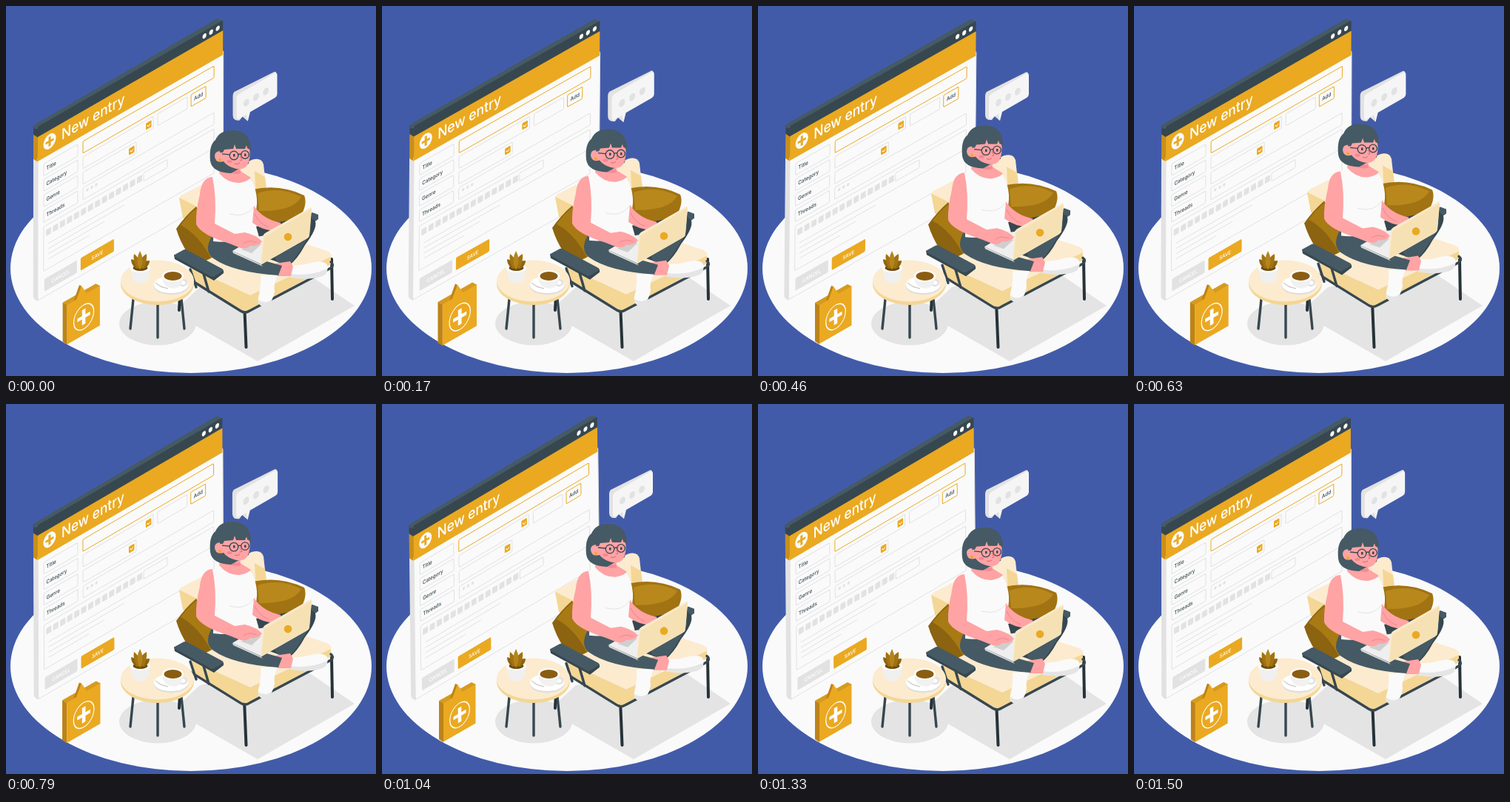
Recreate the animation shown at these times as an HTML page. Size 500 px wide and 500 px high, loop 1.54 s.

```html
<!DOCTYPE html>
<html lang="en">
<head>
<meta charset="utf-8">
<style>
html,body{margin:0;width:100%;height:100%;overflow:hidden;background:#425ba9}
svg{display:block;width:100vw;height:100vh}
text{font-family:Inter,sans-serif;font-weight:500}
.dark{fill:#37474f}.slate{fill:#455a64}.gold{fill:#eaa921}.deep{fill:#bd8318}
.white{fill:#fafafa}.grey{fill:#e2e2e2}.skin{fill:#ffa3a5}.cream{fill:#fcebcf}.sand{fill:#f4d695}
.line{fill:none;stroke:#e1e1e1;stroke-width:1}
.rod{fill:none;stroke:#37474f;stroke-width:3.4;stroke-linecap:round;stroke-linejoin:round}
.leg{stroke:#263238;stroke-width:4}
</style>
</head>
<body>
<svg viewBox="0 0 500 500">
<ellipse class="white" cx="250" cy="354.500" rx="244" ry="141.500"/>
<path fill="#e4e4e4" d="M225 414L340 480L471 405L390 350L262 380Z"/>
<ellipse fill="#e4e4e4" cx="205" cy="429" rx="52" ry="29.500"/>

<g id="panel">
  <path class="grey" d="M37 206L43.500 209V399Q37 397 37 392Z"/>
  <path fill="#c98f1c" d="M37 173L43.500 176V211L37 207Z"/>
  <path class="dark" d="M37 162L43.500 165V178L37 174Z"/>
  <path class="slate" d="M37 166Q37 161 41 159L284 17.500Q288 15.500 293 21L43 166Z"/>
  <g id="face" transform="matrix(1 -.577 0 1 0 24)"></g>
</g>

<g id="bubble">
  <path class="grey" d="M309 116L361 90Q364 88 365 91L316 154Q307 155 307 147V121Q307 118 309 116Z"/>
  <path fill="#f5f5f5" d="M315 119L362 91.500Q366 89.500 366 94V119Q366 122 363 124L330 143L327 155L320 149L315 152Q312 153 312 149V124Q312 121 315 119Z"/>
  <path class="grey" d="M320 149L327 155L325 146Z"/>
  <g class="grey" transform="matrix(1 -.577 0 1 0 195)">
    <ellipse cx="325" cy="123" rx="3.800" ry="4.600"/><ellipse cx="338" cy="123" rx="3.800" ry="4.600"/><ellipse cx="351" cy="123" rx="3.800" ry="4.600"/>
  </g>
</g>

<path class="rod leg" d="M235 390L234 411M440 342L441 396M322 400L324.500 461"/>
<g id="seat">
  <path class="slate" d="M382 291L414 279L422 282V288L400 304Z"/>
  <path class="cream" d="M234 261Q234 257 240 254L332 208Q345 204 348 214L352 250L260 300L239 284Z"/>
  <path class="sand" d="M234 259L258 271L262 300L239 286ZM336 223L350 231L353 255L338 262Z"/>
  <path fill="#a17312" d="M333 248Q370 240 403 256Q408 268 397 286L386 298L340 300Z"/>
  <path fill="#b9881d" d="M340 253Q370 243 399 258Q388 278 342 277Z"/>
  <path fill="#8c6310" d="M230 301Q242 284 257 271L288 326L279 347Q262 345 246 335Q235 318 230 301Z"/>
  <path fill="#a87a14" d="M236 296Q246 282 258 273L289 326L279 345Q262 310 236 296Z"/>
  <path class="cream" d="M250 354L352 304L434 331Q441 334 439 340L330 391Z"/>
  <path class="sand" d="M250 354L330 391L439 339V349L328 414L323 413L254 374Z"/>
  <path class="rod" d="M246 368L317 412Q323 416 329 412L439 354Q444 350 439 346"/>
  <path class="rod" d="M249 356L257 380M267 362L274 386"/>
  <path class="dark" d="M227 336L280 364L294 357V361L281 371L228 342Z"/>
  <path class="slate" d="M228 336L239 330Q242 328 245 330L292 355Q295 357 292 359L282 365Q279 367 276 365L229 339Q226 338 228 336Z"/>

  <path class="dark" d="M338 298L384 289Q412 282 418 291Q421 301 404 323Q394 342 382 351L350 340Z"/>
  <path class="slate" d="M354 316L410 291Q417 296 404 320Q393 339 383 349L366 346Z"/>
  <path class="white" d="M384 350Q399 351 412 347Q430 343 434 350Q437 360 426 365Q408 370 384 366Z"/>
  <path fill="#e5e5e5" d="M384 362Q410 366 434 355Q435 363 425 366Q408 371 384 367Z"/>
  <path class="white" d="M344 364L368 363Q361 374 363 386Q360 402 350 406Q339 406 341 394Q345 380 344 364Z"/>
  <path fill="#e5e5e5" d="M341 397Q350 404 360 396Q356 405 350 407Q341 406 341 397Z"/>
  <path class="skin" d="M364 348L384 345L388 352L385 365L367 365Z"/>
  <path class="slate" d="M278 311Q267 331 280 341Q307 360 368 364L373 351L345 343L318 313Z"/>
  <path class="white" d="M279 232Q290 228 296 220L320 224Q337 235 339 261Q340 272 334 293L338 306Q309 322 280 318L281 278Z"/>
  <path fill="none" stroke="#e4e4e4" d="M302 281Q324 287 335 271"/>
  <path class="skin" d="M291 210L316 210L317 223L331 232Q327 237 316 239Q300 240 288 226Z"/>
  <path fill="#f28c92" d="M296 218Q306 224 316 222L317 226Q304 230 296 218Z"/>
  <path class="skin" d="M335 270Q347 288 371 293L373 304Q350 306 333 293Z"/>
  <path fill="none" stroke="#ee868d" d="M336 281Q342 294 355 299"/>
  <path fill="#d9d9d9" d="M306 331L344 349L347 352L307 334Z"/>
  <path fill="#efefef" d="M306 331L338 312L350 310L345 349Z"/>
  <path fill="#cfcfcf" d="M318 329L337 318L345 322L332 334Z"/>
  <path class="skin" d="M279 231Q264 232 262 254Q256 279 257 295Q263 309 302 321L317 327Q326 329 330 324Q342 325 346 318Q337 309 323 306L309 308L282 294Q285 260 279 231Z"/>
  <path fill="none" stroke="#ee868d" d="M321 321Q329 315 339 320"/>
  <path fill="#fbe9c9" d="M347 312Q347 309 350 307L410 273Q413 271 413 274L410 309Q410 312 407 314L344 350Z"/>
  <path fill="#f6e1b5" d="M349 312L413 274L410 309Q410 312 407 314L345 349Z"/>
  <circle class="gold" cx="381" cy="312" r="5.300"/>

  <g id="head">
    <path class="slate" d="M276 209Q274 188 283 181Q289 167 308 168Q328 169 331 190L328 213L304 226Q278 225 276 209Z"/>
    <path class="skin" d="M291 190Q307 182 329 190Q331 207 326 215Q322 222 311 220Q299 217 294 210Q283 213 282 203Q282 196 290 196Z"/>
    <path class="slate" d="M289 198L291 181L329 183L331 195L326 192L325 188L323 193L311 193L309 187L307 193L295 194L293 198Z"/>
    <circle class="gold" cx="289" cy="208" r="2"/>
    <g fill="none" stroke="#37474f" stroke-width="1.300">
      <circle cx="308" cy="202" r="5.800"/><circle cx="323" cy="201" r="5.300"/>
      <path d="M292 200L302 201M314 201Q316 199 318 201"/>
    </g>
    <path class="dark" d="M307 200h2.500v3.500h-2.500zM322 199.500h2.500v3.500h-2.500z"/>
    <path fill="none" stroke="#e0656f" d="M316 203L319 208L316 209M309 213Q312 215 316 212"/>
    <ellipse fill="#f6858d" cx="302" cy="210" rx="3.500" ry="2"/>
  </g>
</g>

<path class="rod" d="M172 396L168 436M205 402V448M237 396L241 436"/>
<ellipse class="sand" cx="204.500" cy="375" rx="49.500" ry="29"/>
<ellipse class="cream" cx="204.500" cy="371.500" rx="49.500" ry="28"/>
<path fill="#f0f0f0" d="M168 354H195L192 370Q181 379 171 370Z"/>
<ellipse fill="#fff" cx="181.500" cy="354" rx="13.500" ry="6"/>
<ellipse fill="#6c4a0c" cx="181.500" cy="354" rx="10" ry="4"/>
<path fill="#8c6310" d="M176 355Q169 350 169 342Q177 344 180 350Q183 344 194 344Q194 351 187 355Z"/>
<path fill="#a17312" d="M177 354Q171 344 173 335Q179 339 181 347Q183 338 190 335Q191 346 186 354Z"/>
<path fill="#b5841b" d="M181 357Q174 343 181 331Q188 343 181 357Z"/>
<ellipse fill="#dedede" cx="223" cy="378.500" rx="23" ry="11.500"/>
<ellipse fill="#fff" cx="223" cy="376.500" rx="23" ry="11.500"/>
<ellipse fill="none" stroke="#e1e1e1" cx="239" cy="374" rx="5" ry="4" stroke-width="2.500"/>
<path fill="#f1f1f1" d="M211 365H240Q239 378 231 381Q221 383 215 377Q211 372 211 365Z"/>
<ellipse fill="#fff" cx="225.500" cy="365" rx="14.500" ry="8"/>
<ellipse fill="#8b5d12" cx="225.500" cy="365" rx="12" ry="6"/>
<path fill="none" stroke="#d0d0d0" stroke-width="1.500" d="M202 374L209 379L219 382"/>

<g id="tag">
  <path class="deep" d="M77 401L83 404V457L77 453Z"/>
  <path fill="#d69a1e" d="M77 401L121 376L127 379L83 405Z"/>
  <path class="deep" d="M92 398L99 378L102 379L98 397Z"/>
  <path class="gold" d="M83 404.500L95 397.500L102 379L109 389L126.500 379V431.500L83 456.500Z"/>
  <g transform="matrix(1 -.577 0 1 105 420)">
    <ellipse rx="13.300" ry="16" fill="none" stroke="#fff" stroke-width="1.200"/>
    <path d="M-8.500 0H8.500M0 -10V10" stroke="#fff" stroke-width="4.500"/>
  </g>
</g>
</svg>
<script>
const $ = id => document.getElementById(id);
const face = $('face');
const add = markup => face.insertAdjacentHTML('beforeend', markup);
const rect = (x, y, w, h, attrs, r = 1.5) => add(`<rect x="${x}" y="${y}" width="${w}" height="${h}" rx="${r}" ${attrs}/>`);
const field = (x1, x2, mid, attrs = '') => rect(x1, mid - 8, x2 - x1, 16, `class="line" ${attrs}`);
const label = (x, y, size, fill, str, anchor = 'start') =>
  add(`<text transform="translate(${x} ${y}) scale(.866 1)" font-size="${size}" fill="${fill}" text-anchor="${anchor}">${str}</text>`);
const dot = (x, y, rx, ry, cls) => add(`<ellipse cx="${x}" cy="${y}" rx="${rx}" ry="${ry}" class="${cls}"/>`);
const rows = [227, 248, 269, 290], gold = 'style="stroke:#eaa921"';

// Panel face, drawn flat and projected by the skew of its group
rect(43, 205, 250.5, 194, 'fill="#fafafa" stroke="#e1e1e1"', 3);
rect(43, 164, 250, 15, 'class="dark"', 1);
rect(43, 178, 250, 33, 'class="gold"', 0);
[268, 277, 286].forEach(x => dot(x, 171, 2.7, 3.2, 'white'));
dot(59, 193, 8.5, 9.8, 'white');
add('<path d="M53.500 193h11M59 186.500v13" stroke="#eaa921" stroke-width="3"/>');
add('<g font-weight="600"></g>');
label(75, 200.5, 20, '#fff', 'New entry');
['Title', 'Category', 'Genre', 'Threads'].forEach((name, i) => {
  field(51, 97, rows[i]);
  label(54.5, rows[i] + 2.5, 7.3, '#37474f', name);
});
field(104, 281, rows[0], gold);
[[199, 1], [176, 2]].forEach(([end, i]) => {
  field(104, end, rows[i]);
  rect(end - 10, rows[i] - 4.5, 7.5, 9, 'class="gold"', 1);
  add(`<path d="M${end - 8.3} ${rows[i] - .5}l2 2.200l2.300 -2" fill="none" stroke="#fff"/>`);
});
field(205, 245, rows[1]);
field(250, 270, rows[1], gold);
label(260, rows[1] + 2.5, 7.3, '#37474f', 'Add', 'middle');
field(104, 281, rows[3]);
[110, 116, 122].forEach(x => dot(x, 288, 1.7, 2, 'grey'));
rect(51, 304, 230, 60, 'class="line"');
for (let i = 0; i < 14; i++) rect(54 + i * 9.46, 310, 7, 8.5, 'class="grey"', 1);
rect(186, 309, 32, 11, 'class="line"');
[[330, 280], [337, 160], [344, 133], [351, 112]].forEach(([y, end]) => add(`<path class="line" d="M57 ${y}H${end}"/>`));
rect(52, 375, 44, 17, 'class="grey"');
label(74, 386.5, 7, '#fff', 'CANCEL', 'middle');
rect(101, 375, 45, 17, 'class="gold"');
label(123.5, 386.5, 7, '#fff', 'SAVE', 'middle');

const LOOP = 1540, TAU = Math.PI * 2;
const bump = (t, mid, half) => Math.abs(t - mid) < half ? (1 + Math.cos(Math.PI * (t - mid) / half)) / 2 : 0;
const zoom = (id, x, y, s) => $(id).setAttribute('transform', `translate(${x} ${y}) scale(${s}) translate(${-x} ${-y})`);

function draw(now) {
  const t = now % LOOP;
  const sway = .65 * Math.sin(TAU * (t + 40) / LOOP) - .05;
  const lift = (1 - Math.cos(TAU * (t + 30) / LOOP)) / 2;
  const pulse = 1 + .06 * (bump(t, 170, 260) + bump(t, 170 + LOOP, 260) + bump(t, 700, 220));
  $('panel').setAttribute('transform', `rotate(${sway} 165 210)`);
  $('seat').setAttribute('transform', `translate(0 ${-8 * lift})`);
  $('head').setAttribute('transform', `translate(0 ${-lift})`);
  zoom('bubble', 336.5, 121, pulse);
  zoom('tag', 102, 418, pulse);
}
const start = performance.now();
(function tick() {
  draw(performance.now() - start);
  requestAnimationFrame(tick);
})();
</script>
</body>
</html>
```
